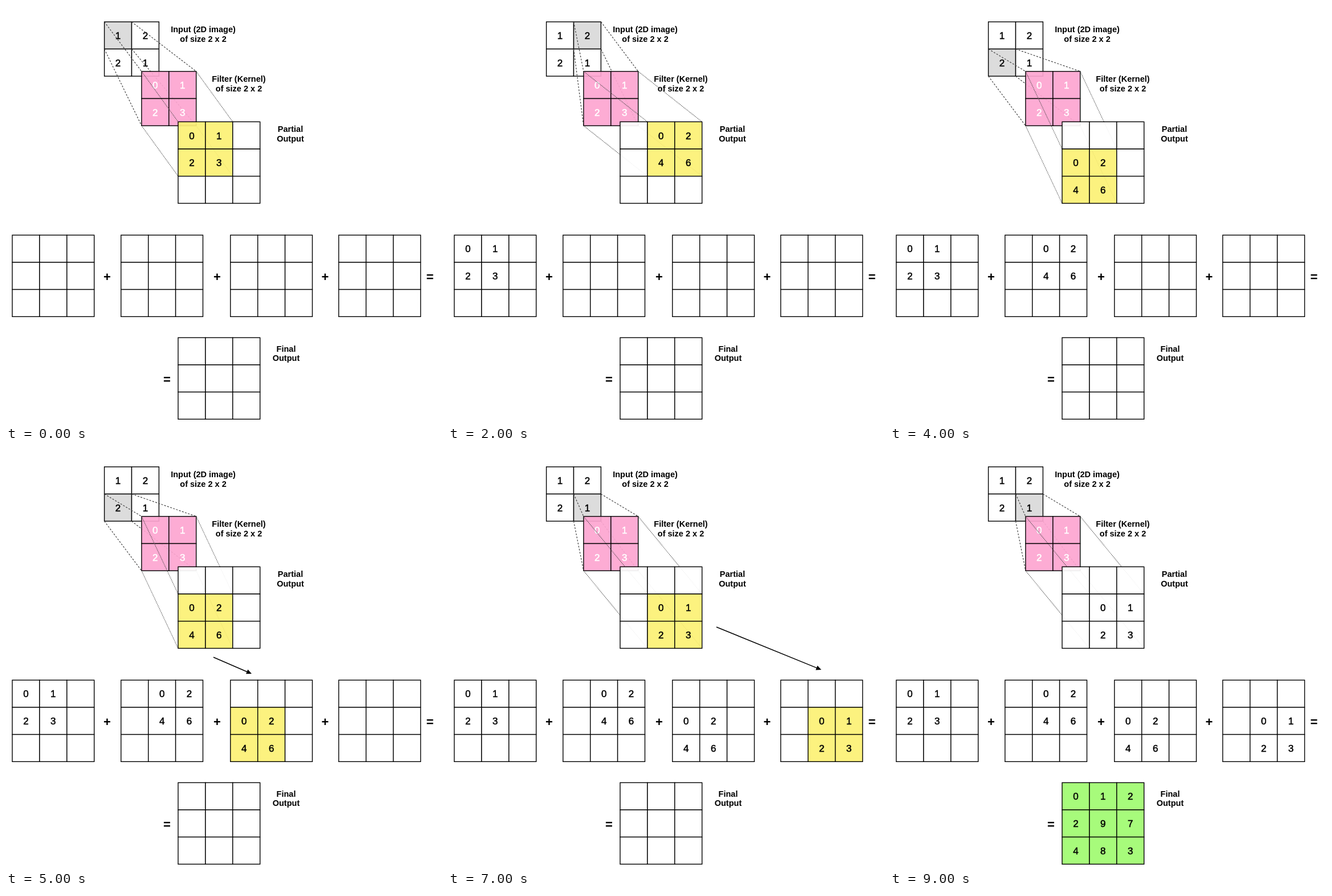
An HTML page for the animation above (10000 ms loop, 765 px wide and 732 px high).

```html
<!DOCTYPE html>
<html lang="en">
<head>
<meta charset="utf-8">
<title>Transposed convolution</title>
<style>
  html, body { margin: 0; width: 100%; height: 100%; overflow: hidden; background: #fff; }
  svg { display: block; width: 100%; height: 100%; }
  text { font-family: "Liberation Sans", Arial, sans-serif; text-anchor: middle; }
  .label { font-size: 14.5px; font-weight: bold; }
  .sign { font-size: 22px; font-weight: bold; }
  .digit { font-size: 17px; stroke-width: .5px; }
  .cell { stroke: #000; stroke-width: 1.4; fill-opacity: .92; }
  .link { stroke: #444; stroke-width: 1.2; }
  .arrow { stroke: #000; stroke-width: 1.5; }
</style>
</head>
<body>
<svg id="stage" viewBox="0 0 765 732"></svg>
<script>
const STEP_MS = 1000, STEPS = 10;
const CELL_W = 47.9, CELL_H = 47.7;
const WHITE = '#fff', GRAY = '#d9d9d9', PINK = '#fda5d1', YELLOW = '#fcf175', GREEN = '#a0fb70';

const input = [1, 2, 2, 1];
const kernel = [0, 1, 2, 3];
const inputAt = [172.6, 27.8], kernelAt = [237.9, 114.8], partialAt = [302, 203.3];
const finalAt = [302, 582.2];
const termX = [11, 201.8, 393.8, 583.8], termY = 402.2;
const arrows = [
  [262, 300, 83, 384],
  [374, 358, 317, 390.5],
  [364, 362, 431, 391],
  [471, 309, 655, 384]
];

const offset = ([x, y], col, row) => [x + col * CELL_W, y + row * CELL_H];

// Values of one 3x3 term: the kernel scaled by input k, placed at that input's position.
function term(k) {
  const values = Array(9).fill(null);
  kernel.forEach((weight, j) => {
    const row = (k >> 1) + (j >> 1), col = k % 2 + j % 2;
    values[row * 3 + col] = input[k] * weight;
  });
  return values;
}
const terms = input.map((_, k) => term(k));
const total = terms[0].map((_, i) => terms.reduce((sum, values) => sum + values[i], 0));

const text = (kind, x, y, value) => `<text class="${kind}" x="${x}" y="${y}">${value}</text>`;

function label(x, y, ...lines) {
  return lines.map((line, i) => text('label', x, y + i * 16.8, line)).join('');
}

function grid(at, size, values, fillOf, ink = '#000') {
  let cells = '', digits = '';
  for (let i = 0; i < size * size; i++) {
    const [x, y] = offset(at, i % size, Math.floor(i / size));
    const value = values[i] ?? null;
    cells += `<rect class="cell" x="${x}" y="${y}" width="${CELL_W}" height="${CELL_H}" fill="${fillOf(value, i)}"/>`;
    if (value !== null) digits += text('digit', x + CELL_W / 2, y + CELL_H / 2 + 6.4, value);
  }
  return cells + `<g fill="${ink}" stroke="${ink}">${digits}</g>`;
}

const filled = color => value => value === null ? WHITE : color;

// Lines joining matching corners of two boxes, in cell units.
function links(from, fromSize, to, toSize, dash) {
  return [[0, 0], [1, 0], [0, 1], [1, 1]].map(([cx, cy]) => {
    const [x1, y1] = offset(from, cx * fromSize, cy * fromSize);
    const [x2, y2] = offset(to, cx * toSize, cy * toSize);
    return `<path class="link" stroke-dasharray="${dash}" d="M${x1} ${y1}L${x2} ${y2}"/>`;
  }).join('');
}

function arrow([x1, y1, x2, y2]) {
  const angle = Math.atan2(y2 - y1, x2 - x1) * 180 / Math.PI;
  const length = Math.hypot(x2 - x1, y2 - y1);
  return `<g transform="translate(${x2} ${y2}) rotate(${angle})">
    <path class="arrow" d="M${-length} 0H-7"/><path d="M0 0L-9 -4.2V4.2Z"/></g>`;
}

function scene(step) {
  const active = Math.min(3, step >> 1);
  const col = active % 2, row = active >> 1;
  const summing = step === 8, done = step === 9;

  let out = label(346, 46, 'Input (2D image)', 'of size 2 x 2')
    + label(408.5, 133, 'Filter (Kernel)', 'of size 2 x 2')
    + label(499, 221, 'Partial', 'Output')
    + label(491.5, 606.5, 'Final', 'Output');

  out += grid(inputAt, 2, input, (_, i) => i === active ? GRAY : WHITE)
    + links(offset(inputAt, col, row), 1, kernelAt, 2, '3 2.5')
    + grid(kernelAt, 2, kernel, () => PINK, WHITE)
    + links(kernelAt, 2, offset(partialAt, col, row), 2, '1.2 1.4')
    + grid(partialAt, 3, terms[active], filled(step < 8 ? YELLOW : WHITE));

  termX.forEach((x, k) => {
    const color = summing ? GREEN : step === 2 * k + 1 ? YELLOW : WHITE;
    out += grid([x, termY], 3, step > 2 * k ? terms[k] : [], filled(done ? WHITE : color));
  });
  out += grid(finalAt, 3, done ? total : [], filled(GREEN));

  [[177.5, '+'], [370.5, '+'], [560, '+'], [744, '=']].forEach(([x, sign]) => {
    out += text('sign', x, 483, sign);
  });
  out += text('sign', 282.5, 663, '=');

  if (step % 2 && step < 8) out += arrow(arrows[active]);
  return out;
}

const stage = document.getElementById('stage');
let shown = -1;
function tick() {
  const step = Math.floor(performance.now() / STEP_MS) % STEPS;
  if (step !== shown) stage.innerHTML = scene(shown = step);
  requestAnimationFrame(tick);
}
tick();
</script>
</body>
</html>
```
